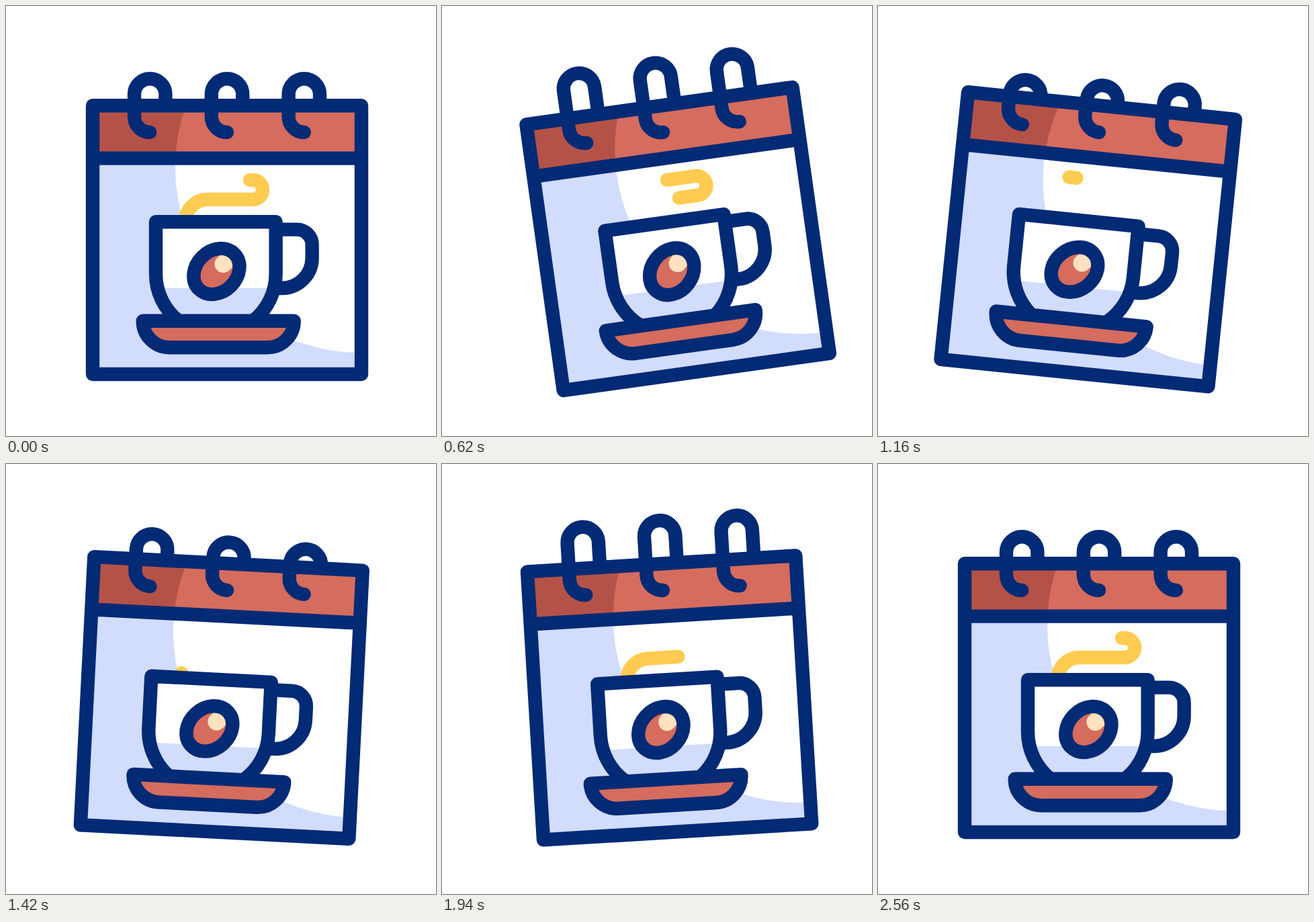
An HTML page for the animation above (2.62 s loop, 640 by 640 pixels).

```html
<!DOCTYPE html>
<html lang="en">
<head>
<meta charset="utf-8">
<title>Coffee break calendar</title>
<style>
  html, body { margin: 0; height: 100%; overflow: hidden; background: #fff; }
  svg { display: block; width: 100vw; height: 100vh; }
  .line { fill: none; stroke: #032a75; stroke-width: 20.4; stroke-linejoin: round; }
  .round { stroke-linecap: round; }
  .red { fill: #d56c5d; }
  .shade { fill: #d2dcfd; }
</style>
</head>
<body>
<svg viewBox="0 0 640 640">
  <defs>
    <clipPath id="page"><rect x="129" y="148" width="400" height="400"/></clipPath>
    <clipPath id="header"><rect x="129" y="148" width="400" height="78"/></clipPath>
  </defs>
  <g id="calendar">
    <g clip-path="url(#page)">
      <rect class="shade" x="129" y="148" width="400" height="400"/>
      <circle cx="528" cy="240" r="276" fill="#fff"/>
    </g>
    <g clip-path="url(#header)">
      <rect x="129" y="148" width="400" height="78" fill="#b55247"/>
      <circle class="red" cx="528" cy="240" r="276"/>
    </g>
    <path class="line" d="M129 148.3H529V548H129ZM129 226.6H529"/>
    <path class="line round ring"/>
    <path class="line round ring"/>
    <path class="line round ring"/>

    <path id="steam" d="M267 321A33 33 0 0 1 300 288H367.5A14.5 14.5 0 0 0 367.5 259H291.5"
      fill="none" stroke="#ffcb50" stroke-width="20.4" stroke-linecap="round"/>

    <path class="line" d="M402 332.6H433A22.6 22.6 0 0 1 455.6 355.2V375A45 45 0 0 1 410.6 420H398"/>
    <path fill="#fff" d="M223 321.3H401.6V399A89.3 89.3 0 0 1 368.6 468H256A89.3 89.3 0 0 1 223 399Z"/>
    <path class="shade" d="M225.6 420H399A89.3 89.3 0 0 1 368.6 468H256A89.3 89.3 0 0 1 225.6 420Z"/>
    <path class="line" d="M256 468A89.3 89.3 0 0 1 223 399V321.3H401.6V399A89.3 89.3 0 0 1 368.6 468"/>
    <path class="line" style="fill:#d56c5d" d="M203.7 468.7H428.7A39.5 39.5 0 0 1 389.2 508.2H243.2A39.5 39.5 0 0 1 203.7 468.7Z"/>

    <g transform="translate(313.4 395) rotate(-45)">
      <ellipse class="red" rx="37.3" ry="30.5"/>
      <path d="M14.7 -.6H26" stroke="#ffe0bf" stroke-width="26" stroke-linecap="round"/>
      <ellipse class="line" rx="37.3" ry="30.5"/>
    </g>
  </g>
</svg>
<script>
  const LOOP = 2620, SWING = 600, RING_LAG = 80;
  const ANGLES = [0, -8, 6, -4, 0];
  const LIFTS = [0, -25, 13.7, -25, 0];
  const STEAM_REST = 169, STEAM_END = 241;

  const calendar = document.getElementById('calendar');
  const steam = document.getElementById('steam');
  const rings = document.querySelectorAll('.ring');

  const ease = (t, start, duration) => {
    const x = Math.min(1, Math.max(0, (t - start) / duration));
    return x * x * (3 - 2 * x);
  };

  // Eased value passing through evenly spaced keys
  const swing = (keys, t) => keys.slice(1).reduce(
    (sum, key, i) => sum + (key - keys[i]) * ease(t, i * SWING, SWING), 0);

  function ringPath(x, lift) {
    const r = 23.2;
    return `M${x + r} 148V${131.4 + lift}a${r} ${r} 0 0 0 ${-2 * r} 0V164.8a${r} ${r} 0 0 0 ${r} ${r}`;
  }

  function draw(t) {
    calendar.setAttribute('transform', `rotate(${swing(ANGLES, t)} 329 188)`);
    rings.forEach((ring, i) =>
      ring.setAttribute('d', ringPath(214.2 + 114.8 * i, swing(LIFTS, t - i * RING_LAG))));

    // The old wisp drifts off, then a new one rises from the cup
    const leaving = t < 1320;
    const tail = leaving ? STEAM_END * ease(t, 120, 1200) : 0;
    const head = leaving
      ? STEAM_REST + (STEAM_END - STEAM_REST) * ease(t, 0, 1200)
      : STEAM_REST * ease(t, 1280, 1200);
    steam.setAttribute('stroke-dasharray', `${Math.max(0.01, head - tail)} 999`);
    steam.setAttribute('stroke-dashoffset', -tail);
  }

  const begin = performance.now();
  function tick() {
    draw((performance.now() - begin) % LOOP);
    requestAnimationFrame(tick);
  }
  tick();
</script>
</body>
</html>
```
